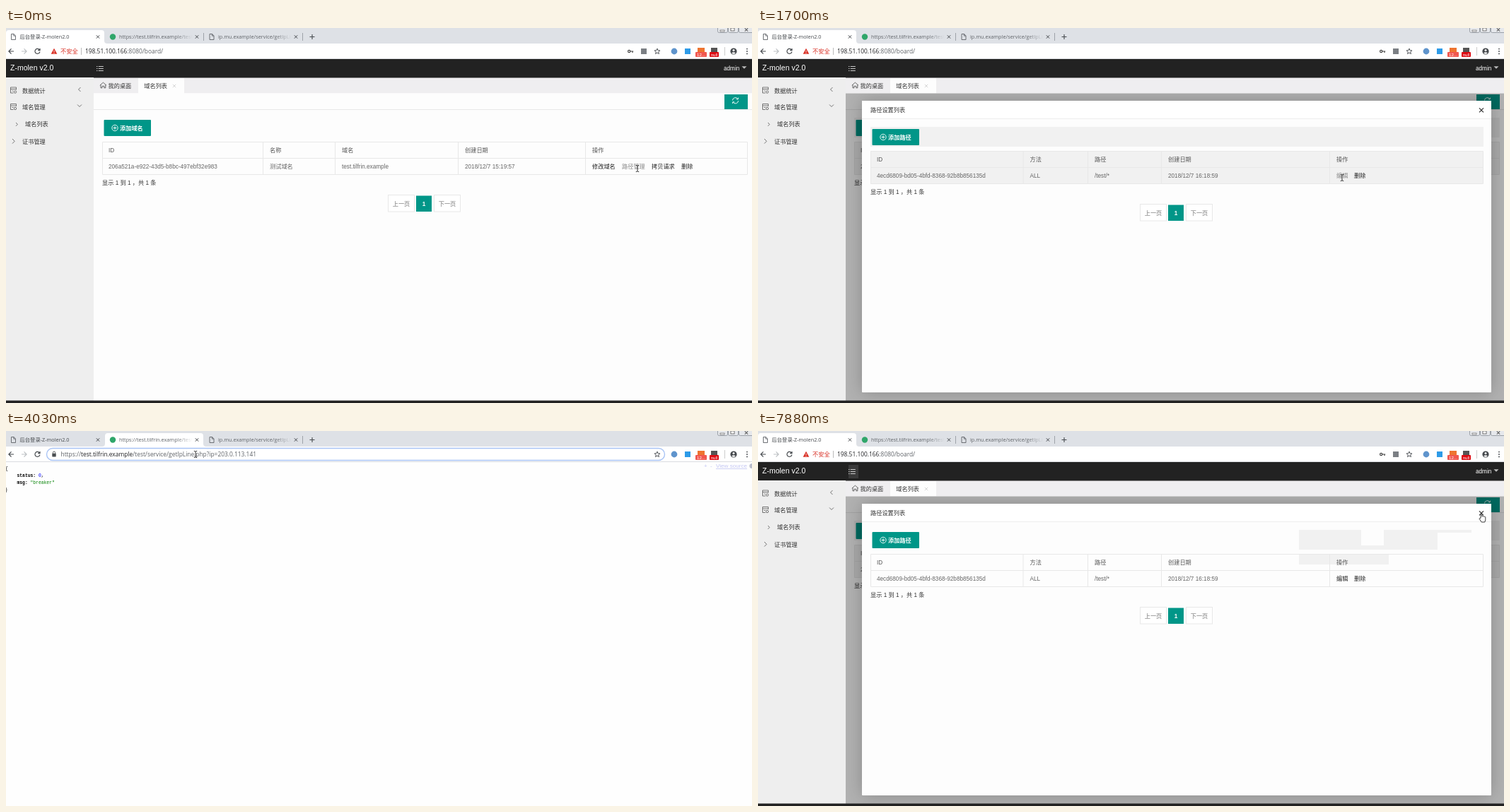
An HTML page for the animation above (8 s loop, 1055x531 px).

```html
<!DOCTYPE html>
<html lang="zh-CN">
<head>
<meta charset="utf-8">
<title>Admin panel walkthrough</title>
<style>
html, body { margin: 0; width: 100%; height: 100%; overflow: hidden; background: #fff; }
svg { display: block; width: 100%; height: 100%; font-family: "Liberation Sans", "Noto Sans CJK SC", "Noto Sans CJK JP", sans-serif; }
.ui { font-family: "Open Sans", "Noto Sans CJK SC", "Noto Sans CJK JP", sans-serif; }
.json { font-family: "Liberation Mono", "Noto Sans CJK SC", "Noto Sans CJK JP", monospace; }
</style>
</head>
<body>
<svg viewBox="0 0 1055 531" xmlns="http://www.w3.org/2000/svg"></svg>
<script>
const svg = document.querySelector('svg');
const TEAL = '#009688', RULE = '#e8e8e8', GRAY = '#f1f1f1', INK = '#5f6368';
const HOST = 'test.tilfrin.example', IP = '203.0.113.141';

// Markup helpers
const rect = (x, y, w, h, fill, more = '') =>
  `<rect x="${x}" y="${y}" width="${w}" height="${h}" fill="${fill}" ${more}/>`;
const circle = (x, y, r, fill, more = '') => `<circle cx="${x}" cy="${y}" r="${r}" fill="${fill}" ${more}/>`;
const shape = (d, fill, more = '') => `<path d="${d}" fill="${fill}" ${more}/>`;
const line = (d, color, w = 1) => shape(d, 'none', `stroke="${color}" stroke-width="${w}"`);
const text = (x, y, s, size = 8.2, fill = '#333', more = '') =>
  `<text x="${x}" y="${y}" font-size="${size}" fill="${fill}" ${more}>${s}</text>`;
const ui = (x, y, s, size, fill) => text(x, y, s, size, fill, 'class="ui"');
const group = (id, s, more = '') => `<g id="${id}" ${more}>${s}</g>`;
const cross = (x, y, r, color, w) => line(`M${x - r} ${y - r}l${2 * r} ${2 * r}m0 ${-2 * r}l${-2 * r} ${2 * r}`, color, w);
const fade = (id, end) => `<linearGradient id="${id}" gradientUnits="userSpaceOnUse" x1="${end - 24}" x2="${end}" y1="0" y2="0">
  <stop stop-color="${INK}"/><stop offset="1" stop-color="${INK}" stop-opacity="0"/></linearGradient>`;

function tabStrip() {
  const page = x => line(`M${x} 8.5h3.6l2.4 2.4v5.6h-6zM${x + 3.4} 8.5v2.6h2.6`, INK, .9);
  const buttons = [[1006, 14], [1021, 14], [1036, 24]]
    .map(([x, w]) => rect(x + .5, -4, w, 10.5, '#e6e8ec', 'rx="2" stroke="#888e96" stroke-width=".8"')).join('');
  return rect(0, 0, 1055, 22, '#dee1e6') +
    group('activeTab', shape('M-4 22q4 0 4-4V7q0-4 4-4h131q4 0 4 4v11q0 4 4 4z', '#fff')) +
    group('tabRule', line('M279.5 7v11', '#8f949a', .8)) + line('M419.5 7v11', '#8f949a', .8) +
    page(7.5) + ui(19.5, 15.3, '后台登录-Z-molen2.0', 7.3, '#45494d') +
    circle(151, 12.5, 4.2, '#2fa66a') + ui(160, 15.3, `https://${HOST}/test`, 7.3, 'url(#fadeB)') +
    page(288) + ui(300, 15.3, 'ip.mu.example/service/getIpLine', 7.3, 'url(#fadeC)') +
    [130, 270, 410].map(x => cross(x, 12.5, 2.2, '#45494d', 1)).join('') +
    line('M429.5 12.5h7m-3.5-3.5v7', '#45494d', 1.1) +
    buttons + rect(1010, 3, 6, 2, '#fff', 'stroke="#666" stroke-width=".7"') +
    rect(1025, 0, 5, 4, '#fff', 'stroke="#666" stroke-width=".9"') + cross(1047, 2.5, 2.2, '#666', 1.1);
}

function toolbar() {
  const star = Array.from({ length: 10 }, (_, i) => {
    const a = i * Math.PI / 5 - Math.PI / 2, r = i % 2 ? 1.8 : 4.2;
    return (921 + r * Math.cos(a)).toFixed(2) + ' ' + (33.2 + r * Math.sin(a)).toFixed(2);
  }).join('L');
  const badge = (x, w, fill, s) => rect(x, 34, w, 7, fill, 'rx="1"') +
    text(x + w / 2, 39.8, s, 6.2, '#fff', 'text-anchor="middle"');
  const insecure = shape('M68 28.8l4.3 8h-8.6z', '#d93025') + line('M68 31.8v2.4m0 .8v1', '#fff', .9) +
    ui(77, 36, '不安全', 8.3, '#d93025') + line('M106.5 28v10', '#aaa', .8) +
    ui(112, 36, '198.51.100.166<tspan fill="#5f6368">:8080/board/</tspan>', 8.4, '#202124') +
    circle(881.2, 33, 1.6, 'none', 'stroke="#444" stroke-width="1.2"') + line('M883 33h4.2m-1.2 0v2', '#444', 1.2) +
    rect(898, 29, 8, 8, '#7b7f84');
  const secure = rect(65.3, 31.8, 5.4, 4.6, '#4a4e52', 'rx=".6"') + line('M66.4 32v-1.4a1.6 1.6 0 0 1 3.2 0v1.4', '#4a4e52', .9) +
    ui(77.5, 36, `https://<tspan fill="#202124">${HOST}</tspan>/test/service/getIpLine.php?ip=${IP}`, 8.4, INK);
  return rect(0, 22, 1055, 22, '#fff') + line('M0 43.5h1055', '#dadce0') +
    group('focusRing', rect(57.5, 24.5, 874, 17, '#fff', 'rx="8.5" stroke="#a9c4f5" stroke-width="1.4"')) +
    line('M11 33H4m3.5-3.6L3.9 33l3.6 3.6', '#45494d', 1.2) +
    line('M22 33h7m-3.5-3.6l3.6 3.6-3.6 3.6', '#bcbfc3', 1.2) +
    line('M47.4 31a3.5 3.5 0 1 0 .5 2.6M48 29v2.6h-2.8', '#45494d', 1.2) +
    group('barA', insecure) + group('barB', secure) +
    line(`M${star}z`, '#45494d', .9) + circle(945, 33, 4.4, '#5f94cc') + rect(960, 29, 8, 8, '#2d9be8') +
    rect(978, 28, 10, 7, '#ee7430') + badge(975, 16, '#f1574f', '12...') +
    rect(997, 28, 9, 6, '#555') + badge(995, 13, '#dd0a12', 'null') +
    line('M1016.5 27v12', '#ccc') + circle(1029, 33, 4.6, '#45494d') + circle(1029, 31.6, 1.5, '#fff') +
    shape('M1026.2 35.6q2.8-2.6 5.6 0q-2.8 2.4-5.6 0z', '#fff') +
    [29.6, 33, 36.4].map(y => circle(1048, y, .95, '#45494d')).join('');
}

function addButton(x, y, label) {
  return rect(x, y, 66.5, 23, TEAL, 'rx="1"') + circle(x + 15.5, y + 11.5, 4.2, 'none', 'stroke="#fff" stroke-width=".9"') +
    line(`M${x + 13} ${y + 11.5}h5m-2.5-2.5v5`, '#fff', .9) +
    text(x + 22.5, y + 14.6, label, 8.2, '#fff', 'font-weight="bold"');
}

// Button, table and pager shared by the page and the dialog
function panel({ id, x0, x1, y, add, cols, heads, cells, links, stale = '' }) {
  const w = x1 - x0, xs = [x0, ...cols];
  const row = (list, base, fill) => list.map((s, i) => text(xs[i] + 9, base, s, 8.2, fill)).join('');
  const pageBox = (x, pw, s) => rect(x, y + 109.5, pw, 23.5, '#fff', `stroke="${RULE}"`) +
    text(x + pw / 2, y + 124.6, s, 8.2, '#777', 'text-anchor="middle"');
  return group(id + 'Gray', rect(x0, y, w, 28, GRAY) + rect(x0, y + 34.5, w, 46, GRAY)) + stale +
    addButton(x0 + 2.5, y + 3, add) +
    line(`M${x0 + .5} ${y + 34.5}h${w - 1}v46h${1 - w}zM${x0} ${y + 57.5}h${w}` +
      cols.map(x => `M${x - .5} ${y + 34.5}v46`).join(''), RULE) +
    row(heads, y + 49, '#555') + row(cells, y + 72, '#666') +
    links.map(([x, s], i) => text(x, y + 72, s, 8.2, '#222', `id="${id}Link${i}"`)).join('') +
    text(x0, y + 95.3, '显示 1 到 1 ，共 1 条', 8.2, '#333') +
    pageBox(540.5, 37, '上一页') + pageBox(605.5, 37, '下一页') +
    rect(580, y + 110.5, 22, 22.5, TEAL) + text(591, y + 124.6, '1', 8.2, '#fff', 'text-anchor="middle" font-weight="bold"');
}

function sidebar() {
  const doc = y => line(`M6.5 ${y - 4}h8v3.5M6.5 ${y - 4}v8h4M6.5 ${y - 1.5}h8M8.5 ${y + 1}h2`, '#666', .9) +
    circle(13, y + 2.5, 1.7, 'none', 'stroke="#666" stroke-width=".9"');
  return rect(0, 70, 124, 458, '#eee') + doc(88) + doc(111.5) +
    text(23, 91.5, '数据统计') + text(23, 115, '域名管理') + text(27, 139, '域名列表') + text(23, 164.3, '证书管理') +
    line('M105.5 84l-3 3 3 3M101 108.5l3 3 3-3M14 134l2.4 2.4-2.4 2.4M9 157l3.2 3.3-3.2 3.3', '#666', .9);
}

function dialog() {
  const stale = group('stale', shape('M765 140h88v22h32v-22h124v4h-48v24H765zM765 174.5h127v14.5H765z', GRAY));
  const body = panel({
    id: 'dlg', x0: 159, x1: 1026, y: 140, add: '添加路径', cols: [375.5, 467, 571, 809],
    heads: ['ID', '方法', '路径', '创建日期', '操作'],
    cells: ['4ecd6809-bd05-4bfd-8368-92b8b856135d', 'ALL', '/test/*', '2018/12/7 16:18:59'],
    links: [[818, '编辑'], [843, '删除']], stale
  });
  return rect(147, 103, 890, 413, '#000', 'opacity=".22" filter="url(#soft)"') +
    rect(147, 103, 890, 413, '#fdfdfd', 'rx="1"') + rect(147, 103, 890, 25, '#fff') + line('M147 128.5h890', '#eee') +
    text(159, 118.6, '路径设置列表', 8.2, '#333') + cross(1023, 116.3, 3, '#333', 1.2) +
    group('spinner', line('M585 318a6 6 0 0 1 7-8M597 316a6 6 0 0 1-8 6', '#999', 1.6)) + group('dlgBody', body);
}

function pageA() {
  const list = panel({
    id: 'main', x0: 136, x1: 1049, y: 127, add: '添加域名', cols: [364, 466, 640, 820],
    heads: ['ID', '名称', '域名', '创建日期', '操作'],
    cells: ['206a521a-e922-43d5-b8bc-497ebf32e983', '测试域名', HOST, '2018/12/7 15:19:57'],
    links: [[829, '修改域名'], [871, '路径管理'], [913, '拷贝请求'], [955, '删除']]
  });
  const frame = rect(124, 92, 931, 436, '#fdfdfd') + line('M124 115.5h931', RULE) +
    rect(1016, 94, 33, 21, TEAL) +
    line('M1027.5 102.5a4 4 0 0 1 7.4-2M1035.6 103a4 4 0 0 1-7.4 2M1035.6 98.6l-.4 2.4-2.4-.3M1027.4 107l.5-2.4 2.4.3', '#fff', .9) +
    list + group('dim', rect(124, 92, 931, 436, '#000', 'opacity=".3"')) + group('dlg', dialog());
  return rect(0, 44, 1055, 27, '#222') + text(6, 60.3, 'Z-molen v2.0', 10.5, '#fff') +
    group('menuHover', rect(128, 48, 14, 19, '#3a3a3a')) +
    line('M128 54.5h1.4m1.4 0h7M128 57.5h1.4m1.4 0h7M128 60.5h1.4m1.4 0h7', '#ddd', .9) +
    text(1015, 59.7, 'admin', 8.2, '#fff') + shape('M1040.5 54.3h7l-3.5 3.5z', '#bbb') +
    sidebar() + rect(124, 70.5, 931, 22, '#efeef0') +
    line('M132.8 81.2l4.6-4 4.6 4M134 80.5v4.3h2v-2.5h2.8v2.5h2v-4.3', '#555', .9) + text(144.5, 84.6, '我的桌面') +
    rect(187, 71, 65, 22, '#fdfdfd') + text(195.3, 84.6, '域名列表') + cross(238, 82, 2.2, '#ccc', .8) +
    `<g clip-path="url(#frame)">${frame}</g>` + rect(0, 527.5, 1055, 4, '#222');
}

// JSON viewer
const jsonText = (x, i, s) => text(x, 55.2 + i * 9.95, s, 6.33, '#000', 'class="json"');
function pair(x, i, key, value) {
  const quoted = typeof value === 'string';
  const shown = quoted ? `"${value.replace(/[^\x00-\x7f]+/g, s => `<tspan font-size="7.6">${s}</tspan>`)}"` : value;
  return jsonText(x, i, `<tspan font-weight="bold">${key}:</tspan> <tspan fill="${quoted ? '#008000' : '#00f'}">${shown}</tspan>,`);
}
function pageB() {
  const fields = {
    ip: IP, country: '中国', area: '', region: '广东', city: '深圳', county: 'XX', isp: '宽带', country_id: 'CN',
    area_id: '', region_id: '440000', city_id: '440300', county_id: 'xx', isp_id: '100017'
  };
  const broken = pair(15.5, 1, 'status', 0) +
    jsonText(15.5, 2, '<tspan font-weight="bold">msg:</tspan> <tspan fill="#008000">"breaker"</tspan>') + jsonText(-1.5, 3, '}');
  const full = pair(15.5, 1, 'code', 0) + jsonText(6.5, 2, '<tspan font-weight="bold">-</tspan>') +
    jsonText(15.5, 2, '<tspan font-weight="bold">data:</tspan> {') +
    Object.entries(fields).map(([k, v], i) => pair(32, i + 3, k, v)).join('') + jsonText(15, 16, '}') + jsonText(-1.5, 17, '}');
  const pale = '#c3c6f3';
  return rect(0, 44, 1055, 487, '#fefefe') +
    group('json', jsonText(-1, 0, '{') + group('broken', broken) + group('full', full) +
      group('linkBack', rect(983, 44, 72, 12, '#f4f4fe')) +
      text(987, 52.2, '+', 8.1, pale) + text(996, 52.2, '-', 8.1, pale) +
      text(1004, 52.2, 'View source', 8.1, pale, 'text-decoration="underline"') + circle(1055, 49.5, 3.6, '#b9bccb'));
}

const cursors =
  group('arrow', shape('M0 0v9.4l2.2-2 1.6 3.6 1.6-.7-1.6-3.5h3z', '#fff', 'stroke="#222" stroke-width=".8"')) +
  group('beam', line('M-2.2-4.6q2.2 0 2.2 1.2v6.8q0 1.2-2.2 1.2M2.2-4.6q-2.2 0-2.2 1.2m0 6.8q0 1.2 2.2 1.2', '#222', .9)) +
  group('hand', shape('M-.9 6.3V.6q.9-1.2 1.8 0v3.2q1-.8 1.7.2q1-.6 1.7.3q1.3-.3 1.5.9v3.6l-1 3.2h-4.6l-3-4.6q.2-1.6 1.9-1.1z',
    '#fff', 'stroke="#222" stroke-width=".9"'));

svg.innerHTML = `<defs>${fade('fadeB', 264)}${fade('fadeC', 404)}
  <clipPath id="frame">${rect(124, 92.5, 931, 435.5, '#000')}</clipPath>
  <filter id="soft" x="-10%" y="-20%" width="120%" height="140%"><feGaussianBlur stdDeviation="12"/></filter></defs>` +
  rect(0, 0, 1055, 531, '#fff') + tabStrip() + toolbar() + group('pageA', pageA()) + group('pageB', pageB()) + group('pointer', cursors);

// The screen repaints in bursts: start, end, number of steps
const bursts = [[130, 130, 1], [590, 1550, 8], [1700, 2120, 4], [2800, 3770, 8], [3910, 4030, 2],
  [4620, 4890, 3], [5290, 5780, 4], [6080, 6990, 8], [7140, 7880, 6]];
const path = [
  [0, 893, 199, 'beam'], [130, 882, 199, 'beam'], [590, 880, 199, 'arrow'], [1001, 876, 203, 'arrow'],
  [1550, 838, 214, 'arrow'], [1700, 826, 212, 'beam'], [2120, 851, 216, 'arrow'], [2800, 820, 200, 'arrow'],
  [3340, 231, 9, 'arrow'], [3500, 231, 9, 'arrow'], [3770, 262, 31, 'beam'], [4030, 268, 33, 'beam'],
  [5290, 268, 33, 'beam'], [5453, 215, 30, 'beam'], [5600, 150, 18, 'arrow'], [5780, 100, 10, 'arrow'],
  [6210, 87, 13, 'arrow'], [6470, 87, 13, 'arrow'], [6600, 132, 56, 'arrow'], [6990, 888, 155, 'arrow'],
  [7140, 893, 160, 'arrow'], [7870, 1021, 118, 'hand'], [7880, 1023, 117, 'hand']
];

function repaintTime(t) {
  let at = 0;
  for (const [a, b, n] of bursts) {
    const step = (b - a) / (n - 1) || 1;
    if (t >= a) at = a + Math.min(n - 1, Math.floor((t - a) / step + 1e-6)) * step;
  }
  return at;
}

const node = id => document.getElementById(id);
const show = (id, on) => node(id).setAttribute('visibility', on ? 'inherit' : 'hidden');

function movePointer(t) {
  let i = path.length - 1;
  while (path[i][0] > t) i--;
  const [ta, xa, ya, kind] = path[i], [tb, xb, yb] = path[i + 1] || path[i];
  const k = tb > ta ? (t - ta) / (tb - ta) : 0;
  node('pointer').setAttribute('transform', `translate(${xa + (xb - xa) * k} ${ya + (yb - ya) * k})`);
  for (const id of ['arrow', 'beam', 'hand']) show(id, id === kind);
}

function draw(time) {
  const t = repaintTime(time), within = (a, b) => t >= a && t < b;
  const second = within(3350, 6210), opened = t >= 590;
  show('pageA', !second);
  show('barA', !second);
  show('tabRule', !second);
  show('pageB', second);
  show('barB', second);
  node('activeTab').setAttribute('transform', `translate(${second ? 140 : 0} 0)`);
  show('focusRing', within(3910, 4620) || within(5290, 5780));

  show('mainGray', opened);
  show('dim', opened);
  show('dlg', opened);
  const u = Math.min(1, Math.max(0, (t - 530) / 300)), p = u * u * (3 - 2 * u);
  node('dlg').setAttribute('transform', `translate(592 309.5) scale(${.5 + p / 2}) translate(-592 -309.5)`);
  node('dlg').setAttribute('opacity', p);
  const loaded = t >= 1138;
  show('spinner', !loaded);
  show('dlgBody', loaded);
  show('dlgGray', t < 6080);
  show('stale', t >= 6990);
  show('menuHover', t >= 6600);
  node('mainLink1').setAttribute('fill', '#888');
  node('dlgLink0').setAttribute('fill', within(1700, 1900) ? '#888' : '#222');

  show('json', !within(4620, 4750));
  show('broken', t < 4620);
  show('full', t >= 4750);
  show('linkBack', t >= 4750);
  movePointer(t);
}

const start = performance.now();
function tick() {
  draw((performance.now() - start) % 8000);
  requestAnimationFrame(tick);
}
tick();
</script>
</body>
</html>
```
